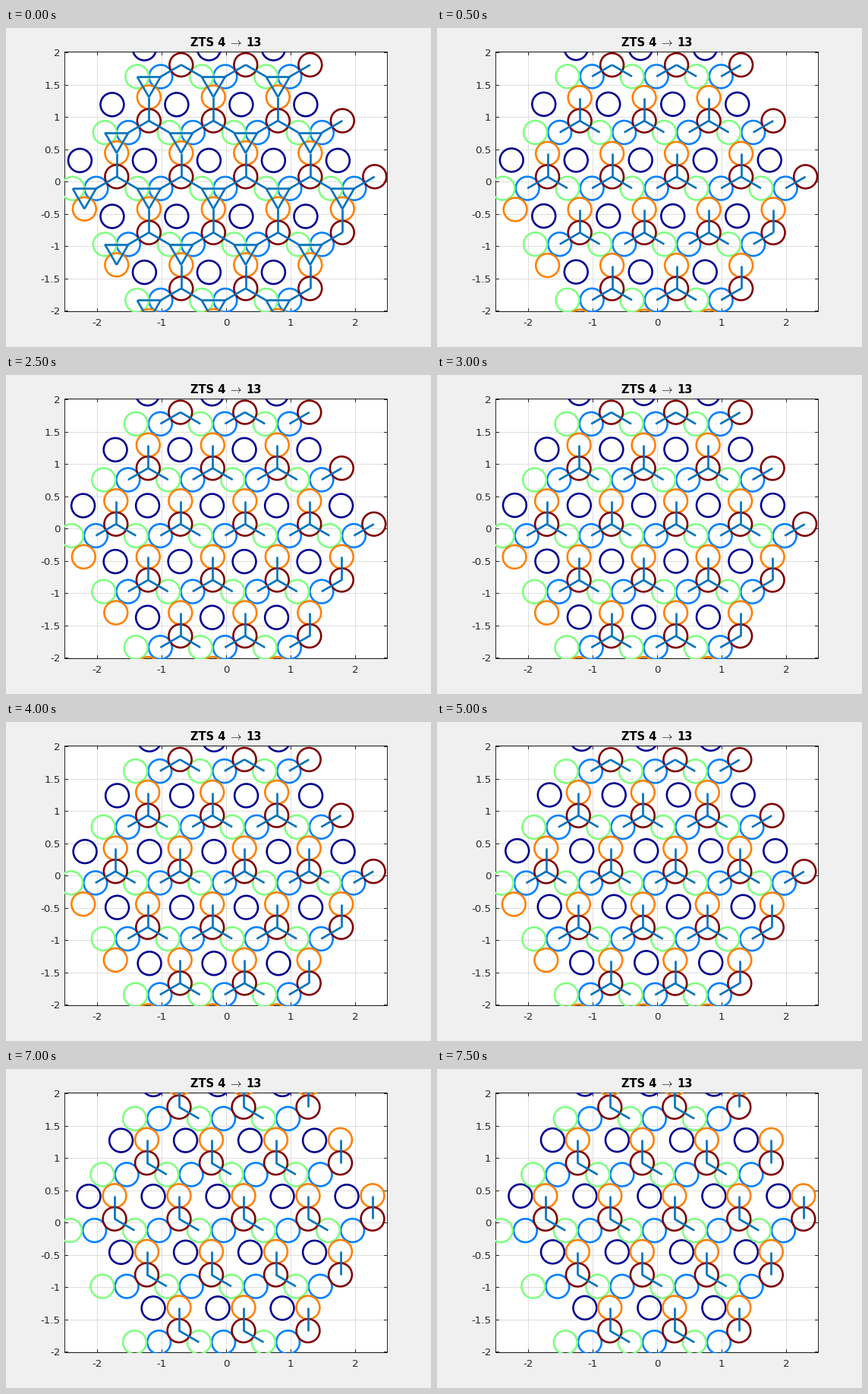
These frames come from a looping animation (560x420 px, 8000 ms). A matplotlib script:

```python
import numpy as np
import matplotlib.pyplot as plt
from matplotlib.animation import FuncAnimation
from matplotlib.collections import EllipseCollection, LineCollection
from matplotlib.patches import Rectangle

W, H, DPI = 560, 420, 100
FRAMES, INTERVAL = 16, 500
PT = 72 / DPI                      # points per pixel
A = 85.0                           # lattice constant in pixels
X0, Y0 = 290.0, 202.5              # plot origin on the stage
LEFT, RIGHT, TOP, BOTTOM = 77.5, 502.5, 31.5, 373.5
INK = "#262626"
JET = [(0, 0, 0.5625), (0, 0.5, 1), (0.5, 1, 0.5), (1, 0.5, 0), (0.5, 0, 0)]
NAVY, BLUE, GREEN, ORANGE, RED = range(5)
A1, A2 = np.array([A, 0]), np.array([A / 2, -A * np.sqrt(3) / 2])
CELLS = np.array([i * A1 + j * A2 for i in range(-2, 3) for j in range(-2, 3)
                  if abs(i + j) <= 2])
REGULAR, RELAXED = A / (1 + np.sqrt(3)), 30.5
WRAP = 14                          # orange site re-enters the unit cell

plt.rcParams["font.family"] = "DejaVu Sans"
fig = plt.figure(figsize=(W / DPI, H / DPI), dpi=DPI, facecolor="#f0f0f0")
ax = fig.add_axes([0, 0, 1, 1])
ax.set(xlim=(0, W), ylim=(H, 0))
ax.axis("off")


def line(xs, ys, color, z):
    ax.plot(xs, ys, color=color, lw=PT, snap=False, zorder=z,
            solid_capstyle="projecting" if z > 1 else "butt")


def label(x, y, s, px, **kw):
    ax.text(x, y, s, fontsize=px * PT, va="baseline", **kw)


ax.add_patch(Rectangle((LEFT, TOP), RIGHT - LEFT, BOTTOM - TOP,
                       fc="white", ec="none", zorder=0))
for v in range(-2, 3):
    x = X0 + A * v + 0.5
    line([x, x], [TOP, BOTTOM], "#dedede", 1)
    line([x, x], [BOTTOM, BOTTOM - 4], INK, 2)
    line([x, x], [TOP, TOP + 4], INK, 2)
    label(X0 + A * v, 392, str(v), 13.33, color=INK, ha="center")
for v in np.arange(-2, 2.1, 0.5):
    y = np.floor(Y0 - A * v) + 0.5
    line([LEFT, RIGHT], [y, y], "#dedede", 1)
    line([LEFT, LEFT + 4], [y, y], INK, 2)
    line([RIGHT, RIGHT - 4], [y, y], INK, 2)
    label(71.5, y + 4.8, f"{v:g}", 13.33, color=INK, ha="right")
line([LEFT, RIGHT, RIGHT, LEFT, LEFT], [TOP, TOP, BOTTOM, BOTTOM, TOP], INK, 2)

label(243, 24, "ZTS 4", 14.67, weight="bold")
label(302.5, 24, r"$\rightarrow$", 14.67, ha="center", math_fontfamily="cm")
label(316, 24, "13", 14.67, weight="bold")

clip = Rectangle((77, 31), 426, 343, transform=ax.transData)
rings = []
for k, color in enumerate(JET):
    ring = EllipseCollection([30.8], [30.8], [0], units="xy", offsets=CELLS,
                             offset_transform=ax.transData, facecolors="none",
                             edgecolors=[color], linewidths=2.6 * PT, zorder=3 + k)
    ax.add_collection(ring, autolim=False)
    ring.set_clip_path(clip)
    rings.append(ring)
bonds = LineCollection([], colors="#0072bd", linewidths=2.67 * PT, zorder=9)
ax.add_collection(bonds, autolim=False)
bonds.set_clip_path(clip)


def basis(n):
    """Positions of the five sites of the central cell."""
    d = RELAXED if n else REGULAR
    drift = n * np.array([0.833, -0.48])
    red = np.array([315.8, 195.7]) - drift * 0.24
    side = d * np.sqrt(3) / 2
    return [np.array([267.4, 174.4]) + drift,
            red + (-side, d / 2),
            red + (side, d / 2) - A1,
            red + (0, -d) - (A2 if n < WRAP else 0),
            red]


def near(p, q, limit):
    """Segments between points of p and q closer than limit."""
    dist = np.hypot(*(p[:, None] - q[None]).transpose(2, 0, 1))
    return [(p[i], q[j]) for i, j in np.argwhere(dist < limit)]


def update(n):
    sites = [CELLS + b for b in basis(n)]
    for ring, pts in zip(rings, sites):
        ring.set_offsets(pts)
    pairs = [(RED, GREEN), (RED, ORANGE)]
    if n < WRAP:
        pairs.append((RED, BLUE))
    if n == 0:
        pairs += [(BLUE, GREEN), (GREEN, ORANGE), (ORANGE, BLUE)]
    bonds.set_segments([s for a, b in pairs for s in near(sites[a], sites[b], 31.4)])
    return rings + [bonds]


anim = FuncAnimation(fig, update, frames=FRAMES, interval=INTERVAL,
                     repeat=True, repeat_delay=0, blit=False)
plt.show()
```
